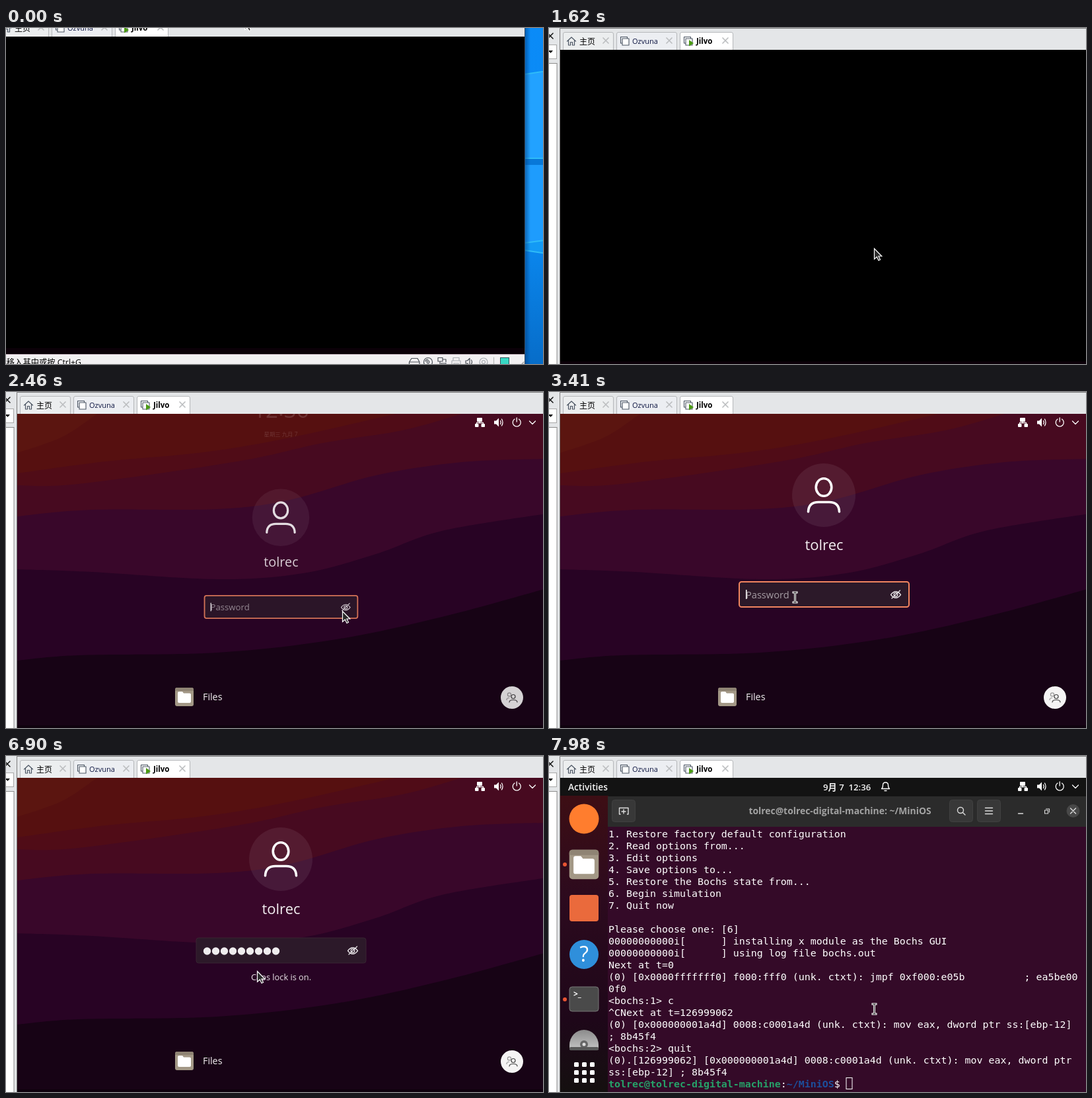
Write an HTML page that moves like this. It is 813 px wide and 508 px high and loops after 8 s.

```html
<!DOCTYPE html>
<html lang="zh-CN">
<head>
<meta charset="utf-8">
<title>Guest login</title>
<style>
html, body { margin: 0; width: 100%; height: 100%; overflow: hidden; background: #000; }
svg { display: block; width: 813px; height: 508px; }
text { font-family: "Open Sans", "Noto Sans", "Noto Sans CJK SC", "Noto Sans CJK", sans-serif; white-space: pre; }
.mid { text-anchor: middle; }
.line { fill: none; stroke-linecap: round; stroke-linejoin: round; }
#term text { font: 14.95px "DejaVu Sans Mono", "Liberation Mono", monospace; fill: #fff; }
#term .b { font-weight: bold; }
</style>
</head>
<body>
<svg viewBox="0 0 813 508" xmlns="http://www.w3.org/2000/svg">
<defs>
  <clipPath id="vmClip"><rect x="17" y="33" width="801" height="480"/></clipPath>
  <linearGradient id="sky" x2="0" y2="1">
    <stop offset="0" stop-color="#0a8bf8"/><stop offset=".6" stop-color="#0b8af2"/><stop offset="1" stop-color="#0668c2"/>
  </linearGradient>
  <linearGradient id="shade"><stop offset="0" stop-color="#003a78" stop-opacity=".6"/><stop offset="1" stop-color="#003a78" stop-opacity="0"/></linearGradient>
  <linearGradient id="dockBg" x2="0" y2="1">
    <stop offset="0" stop-color="#3d0e14"/><stop offset=".35" stop-color="#2c0a1e"/><stop offset=".75" stop-color="#1e0719"/><stop offset="1" stop-color="#14100f"/>
  </linearGradient>
  <linearGradient id="disc" x2="0" y2="1"><stop offset="0" stop-color="#8b8b8b"/><stop offset="1" stop-color="#c4c4c4"/></linearGradient>
  <g id="pages" class="line" stroke="#4b5563" stroke-width="1.1">
    <path d="M-4 3H-6.5V-6.5H3.5V-4"/><rect x="-4" y="-4" width="10" height="10" fill="#fff"/>
  </g>
  <path id="cross" class="line" d="M-4 -4L4 4M4 -4L-4 4"/>
  <g id="folder">
    <rect x="-14" y="-14" width="28" height="28" rx="3" fill="#a39886"/>
    <path d="M-14 -9V-11Q-14 -14 -11 -14H11Q14 -14 14 -11V-9Z" fill="#8f8474"/>
    <path d="M-10 8V-6Q-10 -8 -8 -8H-3L-1 -5.5H8Q10 -5.5 10 -3.5V7Q10 9 8 9H-8Q-10 9 -10 7Z" fill="#fff"/>
  </g>
  <g id="tray">
    <g fill="#fff"><rect x="713" y="39" width="8" height="6" rx="1"/><rect x="710" y="48" width="5.5" height="5" rx="1"/><rect x="719.5" y="48" width="5.5" height="5" rx="1"/>
      <path d="M739 43.5H742L746 39.5V52.5L742 48.5H739Z"/></g>
    <g class="line" stroke="#fff" stroke-width="1.3">
      <path d="M717 45V47M712.5 48V46.5H722.5V48M748.5 43.5Q750 46 748.5 48.5M750.5 41Q753.5 46 750.5 51"/>
      <path d="M770 41A6 6 0 1 0 776.5 41M773.2 39V45M792.5 44L797 48.5L801.5 44"/>
    </g>
  </g>
</defs>

<g id="scene">
  <!-- host desktop at the right of the window -->
  <g id="desk">
    <rect x="818" y="-20" width="80" height="580" fill="url(#sky)"/>
    <path d="M818 90L898 78V218H818Z" fill="#22a2ff"/>
    <path d="M818 227H898V333L818 345Z" fill="#1e9cfd"/>
    <path d="M818 218H898V227H818Z" fill="#0878d8"/>
    <path d="M818 345L898 335V368L818 356Z" fill="#139af5"/>
    <path class="line" d="M818 90L898 78M818 345L898 334M818 356L898 368M818 217H898" stroke="#2fbcf8" stroke-width="2"/>
    <rect x="818" y="-20" width="9" height="580" fill="url(#shade)"/>
  </g>
  <rect x="-20" width="838" height="560" fill="#e4e6e8"/>
  <rect x="-20" y="53.5" width="32" height="520" fill="#fff" stroke="#8a8a8a"/>
  <rect x="-20" y="25.5" width="31.5" height="21" fill="#fff" stroke="#a8a8a8"/>
  <path d="M-1 34H6L2.5 38Z" fill="#111"/>
  <use href="#cross" x="2" y="12" stroke="#111" stroke-width="1.5"/>
  <path d="M16.5 560V.5H818" fill="none" stroke="#7d7d7d"/>
  <g id="tabs" stroke="#b5b7ba">
    <path d="M21.5 33V9Q21.5 6.5 24 6.5H95Q97.5 6.5 97.5 9V33" fill="#eceeef"/>
    <path d="M102.5 33V9Q102.5 6.5 105 6.5H191Q193.5 6.5 193.5 9V33" fill="#eceef2"/>
    <path d="M198.5 33V9Q198.5 6.5 201 6.5H276Q278.5 6.5 278.5 9V33" fill="#fff"/>
  </g>
  <path class="line" d="M27.5 20L34 14L40.5 20M29.5 19V26H32.5V21.5H35.5V26H38.5V19" stroke="#4b5563" stroke-width="1.2"/>
  <use href="#pages" x="115" y="20"/><use href="#pages" x="211" y="20"/>
  <path d="M212 18L219 23L212 27.5Z" fill="#4a9a12"/>
  <g font-size="11.5">
    <text x="46" y="24.5" font-size="12">主页</text>
    <text x="126" y="24" fill="#0c1440" font-size="11">Ozvuna</text>
    <text x="223" y="24" font-weight="bold">Jilvo</text>
  </g>
  <g stroke="#bcbec0" stroke-width="1.7"><use href="#cross" x="86" y="19"/><use href="#cross" x="182" y="19"/><use href="#cross" x="267" y="19"/></g>

  <!-- status bar -->
  <rect x="17" y="513" width="801" height="40" fill="#f2f0f2"/>
  <path d="M17 513.5H818" stroke="#c9b6c2"/>
  <path d="M818.5 0V553" stroke="#35506a"/>
  <text x="147" y="530" font-size="12.3" text-anchor="end">指针移入其中或按 Ctrl+G</text>
  <g class="line" stroke="#4a4f57" stroke-width="1.2">
    <path d="M643.5 528V525L647 519.5H656L659 525V530H643.5V525H659"/>
    <circle cx="672" cy="525" r="6.5"/><circle cx="672" cy="525" r="1.8"/><path d="M668 524A4 4 0 0 1 672 521"/>
    <path d="M687 518.5H694V524H687ZM692 527H699V532H692ZM690 524V529H692M694 521H699V525"/>
    <g stroke="#a9adb2"><path d="M710 523V518.5H719V523M708 529V523H721V529M711 527H718V532H711Z"/><circle cx="756" cy="525" r="6"/><circle cx="756" cy="525" r="2.5"/></g>
    <path d="M729 523H731.5L735 519.5V531L731.5 527H729ZM737.5 522Q739.5 525 737.5 528"/>
    <path d="M771.5 518V531" stroke="#b8b8b8"/>
    <path d="M812 530L817 525M815 530L817 528" stroke="#999"/>
  </g>
  <rect x="781.5" y="518.5" width="13" height="13" fill="#38d8c4" stroke="#35525a"/>

  <!-- guest screen -->
  <g clip-path="url(#vmClip)">
    <rect x="17" y="33" width="801" height="480"/>
    <rect x="17" y="504" width="801" height="9" fill="#0b0008"/>
    <g id="desktop" visibility="hidden">
      <rect x="17" y="33" width="801" height="480" fill="#131313"/>
      <rect x="17" y="60" width="73" height="453" fill="url(#dockBg)"/>
      <g fill="#f4f4f4" font-size="13.7" font-weight="600">
        <text x="29" y="52">Activities</text>
        <text x="415" y="52" font-size="13.2">9月 7  12:36</text>
      </g>
      <path class="line" d="M503.5 49.5Q505.5 48 505.5 44Q505.5 40 509.5 40T513.5 44Q513.5 48 515.5 49.5ZM508 52.5H511" stroke="#fff" stroke-width="1.3"/>
      <circle cx="53" cy="95" r="22.5" fill="#ff7d2e"/>
      <use href="#folder" transform="translate(53 164) scale(1.59)"/>
      <rect x="31" y="210" width="44" height="40" rx="4" fill="#ea6a3c"/>
      <circle cx="53" cy="300" r="22" fill="#2f8fdb"/>
      <text class="mid" x="53" y="311" font-size="32" fill="#fff">?</text>
      <rect x="31" y="349" width="44" height="37" rx="4" fill="#4a4a4a" stroke="#777"/>
      <text x="37" y="364" font-size="12" font-weight="bold" fill="#fff">&gt;_</text>
      <path d="M31 437A22 23 0 0 1 75 437V444H31Z" fill="url(#disc)"/>
      <circle cx="53" cy="436" r="6" fill="#666"/><circle cx="53" cy="436" r="2.5" fill="#ddd"/>
      <rect x="31" y="440" width="44" height="5" rx="2" fill="#595959"/>
      <g id="grid" fill="#fff"></g>
      <circle cx="24" cy="164" r="3" fill="#e95432"/><circle cx="24" cy="368" r="3" fill="#e95432"/>
      <rect x="89" y="61" width="729" height="46" fill="#2b2b2b"/>
      <g fill="#383838" stroke="#404040"><rect x="95.5" y="66.5" width="35" height="33" rx="4"/><rect x="606.5" y="66.5" width="35" height="33" rx="4"/><rect x="648.5" y="66.5" width="35" height="33" rx="4"/></g>
      <circle cx="793.5" cy="83" r="10" fill="#484848"/>
      <g class="line" stroke="#ddd" stroke-width="1.4">
        <path d="M108 88H106.5V78.5H120V88H118.5M113 81V87M110 84H116"/>
        <circle cx="623" cy="82" r="4.5"/><path d="M626.5 85.5L630 89M660.5 78.5H671.5M660.5 83H671.5M660.5 87.5H671.5M710.5 87H717.5"/>
        <path d="M750.5 82H755.5V87H750.5ZM752.5 80H757.5V85" stroke-width="1.1"/>
        <use href="#cross" x="793.5" y="83"/>
      </g>
      <text class="mid" x="440.5" y="88" font-size="13.9" font-weight="bold" fill="#a2a2a2">tolrec@tolrec-digital-machine: ~/MiniOS</text>
      <rect x="89" y="107" width="729" height="406" fill="#340a28"/>
      <g id="term"></g>
      <rect x="450" y="486.5" width="9" height="17" fill="none" stroke="#fff"/>
    </g>

    <g id="lock" visibility="hidden">
      <g id="bands"></g>
      <rect x="17" y="504" width="801" height="9" fill="#000" opacity=".35"/>
      <g id="clock" fill="#fff">
        <text class="mid" x="417" y="206" font-size="83">12<tspan dy="-9">:</tspan><tspan dy="9">36</tspan></text>
        <text class="mid" x="416" y="276" font-size="21">星期三 九月 7</text>
      </g>
      <use href="#folder" x="270" y="461"/>
      <text x="298" y="466" font-size="14.3" fill="#f4f0f2">Files</text>
      <g id="login">
        <circle cx="416" cy="156" r="48" fill="#fff" opacity=".07"/>
        <g class="line" stroke="#fff" stroke-width="3.6"><ellipse cx="416" cy="144" rx="11.8" ry="13.3"/><path d="M392.5 181Q393 166.5 408 166.5H424Q439 166.5 439.5 181"/></g>
        <text class="mid" x="416.5" y="238.5" font-size="22" fill="#f3eef1">tolrec</text>
        <g id="field">
          <rect id="box" x="288" y="287" width="257" height="38" rx="3.5" fill="#2c1929"/>
          <text id="hint" x="298" y="312" font-size="14.6" fill="#a59ca3">Password</text>
          <g id="dots" fill="#efecee"></g>
          <rect id="caret" y="299" width="1.5" height="14" fill="#fff"/>
          <g class="line" stroke="#e8e4e7" stroke-width="1.3"><path d="M517.5 306.5Q525 297 532.5 306.5Q525 316 517.5 306.5ZM519 312L531.5 300"/><circle cx="525" cy="306.5" r="2.8"/></g>
        </g>
        <text id="caps" class="mid" x="416.5" y="339" font-size="12.8" fill="#e9e3e7">Caps lock is on.</text>
      </g>
      <g id="switch">
        <circle cx="766" cy="462" r="17" fill="#f5f4f4"/>
        <g class="line" stroke="#444" stroke-width="1.2"><circle cx="768" cy="460.5" r="3"/><path d="M762 469Q762 465.5 768 465.5T774 469"/><g stroke="#999"><circle cx="762" cy="457.5" r="2.6"/><path d="M758 465.5Q758 462.5 761.5 462.5"/></g></g>
      </g>
    </g>
    <use id="trayUse" href="#tray" visibility="hidden"/>
  </g>
</g>
<path id="arrow" d="M.5 .5V16.5L4.3 13L7 18.5L9.5 17.3L7 12H11.8Z" fill="#2a2a2a" stroke="#fff" stroke-width="1.2"/>
<g id="beam" class="line"><path d="M-2.5 -7.5H2.5M0 -7.5V7.5M-2.5 7.5H2.5" stroke="#fff" stroke-width="3" stroke-linecap="square"/><path d="M-2.5 -7.5H2.5M0 -7.5V7.5M-2.5 7.5H2.5" stroke="#222" stroke-width="1"/></g>
</svg>

<script>
const NS = "http://www.w3.org/2000/svg", LOOP = 8000;
const $ = id => document.getElementById(id);
const add = (parent, tag, attrs, text = "") => {
  const el = parent.appendChild(document.createElementNS(NS, tag));
  for (const k in attrs) el.setAttribute(k, attrs[k]);
  el.textContent = text;
};
const set = (id, k, v) => $(id).setAttribute(k, v);
const show = (id, on) => set(id, "visibility", on ? "inherit" : "hidden");

// wallpaper: each layer fills everything below its smooth upper edge
const bend = (a, b, c, e) =>
  `C${b[0] + (c[0] - a[0]) / 6} ${b[1] + (c[1] - a[1]) / 6} ${c[0] - (e[0] - b[0]) / 6} ${c[1] - (e[1] - b[1]) / 6} ${c}`;
const smooth = pts => `M${pts[0]}` + pts.slice(1).map((c, i) =>
  bend(pts[i - 1] || pts[i], pts[i], c, pts[i + 2] || c)).join("");
const layers = [
  ["#561010", [[17, 92], [85, 68], [138, 33]]],
  ["#500c17", [[17, 123], [150, 105], [300, 91], [430, 69], [590, 33]]],
  ["#470a20", [[17, 141], [110, 139], [350, 105], [480, 77], [600, 58], [690, 33]]],
  ["#39072a", [[17, 188], [130, 178], [320, 177], [430, 163], [560, 126], [690, 106], [818, 101]]],
  ["#280324", [[17, 268], [130, 272], [320, 283], [450, 274], [560, 245], [660, 210], [818, 184]]],
  ["#170315", [[17, 406], [110, 398], [320, 394], [500, 374], [660, 340], [818, 297]]]
];
add($("bands"), "rect", { x: 17, y: 33, width: 801, height: 480, fill: "#5b1510" });
for (const [fill, pts] of layers) add($("bands"), "path", { fill, d: smooth(pts) + "L818 33V513H17Z" });

const lines = `1. Restore factory default configuration
2. Read options from...
3. Edit options
4. Save options to...
5. Restore the Bochs state from...
6. Begin simulation
7. Quit now

Please choose one: [6]
00000000000i[      ] installing x module as the Bochs GUI
00000000000i[      ] using log file bochs.out
Next at t=0
(0) [0x0000fffffff0] f000:fff0 (unk. ctxt): jmpf 0xf000:e05b          ; ea5be00
0f0
<bochs:1> c
^CNext at t=126999062
(0) [0x000000001a4d] 0008:c0001a4d (unk. ctxt): mov eax, dword ptr ss:[ebp-12]
; 8b45f4
<bochs:2> quit
(0).[126999062] [0x000000001a4d] 0008:c0001a4d (unk. ctxt): mov eax, dword ptr
ss:[ebp-12] ; 8b45f4
`.split("\n");
lines.forEach((s, i) => add($("term"), "text", { x: 90, y: 123 + 18 * i }, s));
const prompt = $("term").lastChild;
add(prompt, "tspan", { class: "b", fill: "#26a269" }, "tolrec@tolrec-digital-machine");
add(prompt, "tspan", {}, ":");
add(prompt, "tspan", { class: "b", fill: "#1c4f9c" }, "~/MiniOS");
add(prompt, "tspan", {}, "$");

for (let i = 0; i < 9; i++) {
  add($("grid"), "rect", { x: 38 + i % 3 * 12, y: 463 + Math.floor(i / 3) * 12, width: 7, height: 7, rx: 1.5 });
  add($("dots"), "circle", { cx: 304.5 + 13 * i, cy: 307, r: 5.7 });
}

// step tables: [time, value...]
const ease = p => p * p * (3 - 2 * p);
const pan = [[0, 0]];
for (let k = 0; k < 8; k++) pan.push([120 + k * 920 / 7, ease((k + 1) / 8)]);
const unlock = [[0, 0], [2300, .4], [2440, .86], [2580, 1]];
const rise = [[0, 0], [3680, .45], [3850, 1]];
const typing = [4030, 4200, 4480, 5010, 5150, 5300, 5450, 5600, 5760];
const leave = [[0, 0], [7210, .3], [7340, .78], [7470, 1]];
const mouse = [
  [0, "arrow", 361, -14], [910, "arrow", 361, -22],
  [1190, "arrow", 446, 190], [1340, "arrow", 472, 276], [1480, "arrow", 486, 320], [1620, "arrow", 492, 333],
  [1760, "arrow", 505, 327], [1880, "arrow", 508, 328], [2010, "arrow", 510, 330], [2150, "arrow", 509, 331],
  [2720, "arrow", 490, 329], [2860, "beam", 447, 322], [3010, "beam", 405, 315], [3150, "beam", 380, 311],
  [3290, "beam", 372, 310], [3410, "beam", 372.5, 310.5],
  [5910, "arrow", 372, 309], [6780, "arrow", 376, 317], [6900, "arrow", 380, 325],
  [7340, "arrow", 392, 332], [7470, "beam", 425, 350], [7600, "beam", 456, 366], [7720, "beam", 478, 376],
  [7850, "beam", 489, 380], [7980, "beam", 492.5, 382.5]
];
const at = (list, t) => list.filter(r => r[0] <= t).pop();
const val = (list, t) => at(list, t)[1];
const scaled = (cx, cy, s, dy) => `translate(${cx} ${cy + dy}) scale(${s}) translate(${-cx} ${-cy})`;

function draw(t) {
  const p = val(pan, t), u = val(unlock, t), r = val(rise, t), l = val(leave, t);
  const n = typing.filter(k => k <= t).length;
  set("scene", "transform", `translate(${Math.round(-33 * (1 - p))} ${Math.round(-20 * (1 - p))})`);

  show("lock", t >= 1760 && l < 1);
  show("trayUse", t >= 1760);
  show("desktop", t >= 7210);
  set("lock", "transform", `translate(0 ${-480 * l})`);

  set("clock", "opacity", 1 - u);
  set("clock", "transform", scaled(416, 215, 1 - .7 * u, -200 * u));
  set("login", "opacity", u);
  set("login", "transform", scaled(416, 215, .3 + .7 * u, 200 * (1 - u)));
  set("switch", "opacity", u);

  const focus = t < 5910;
  set("field", "transform", `translate(0 ${Math.round(-12 * r)})`);
  set("box", "stroke", focus ? "#f0855f" : "#382533");
  set("box", "stroke-width", focus ? 2 : 1);
  set("caps", "opacity", r);
  show("hint", n === 0);
  show("caret", focus);
  set("caret", "x", 298 + 13 * n);
  [...$("dots").children].forEach((d, i) => d.setAttribute("visibility", i < n ? "inherit" : "hidden"));

  const [, kind, x, y] = at(mouse, t);
  for (const id of ["arrow", "beam"]) show(id, id === kind);
  set(kind, "transform", `translate(${x} ${y})`);
}

const start = performance.now();
function tick() {
  draw((performance.now() - start) % LOOP);
  requestAnimationFrame(tick);
}
tick();
</script>
</body>
</html>
```
